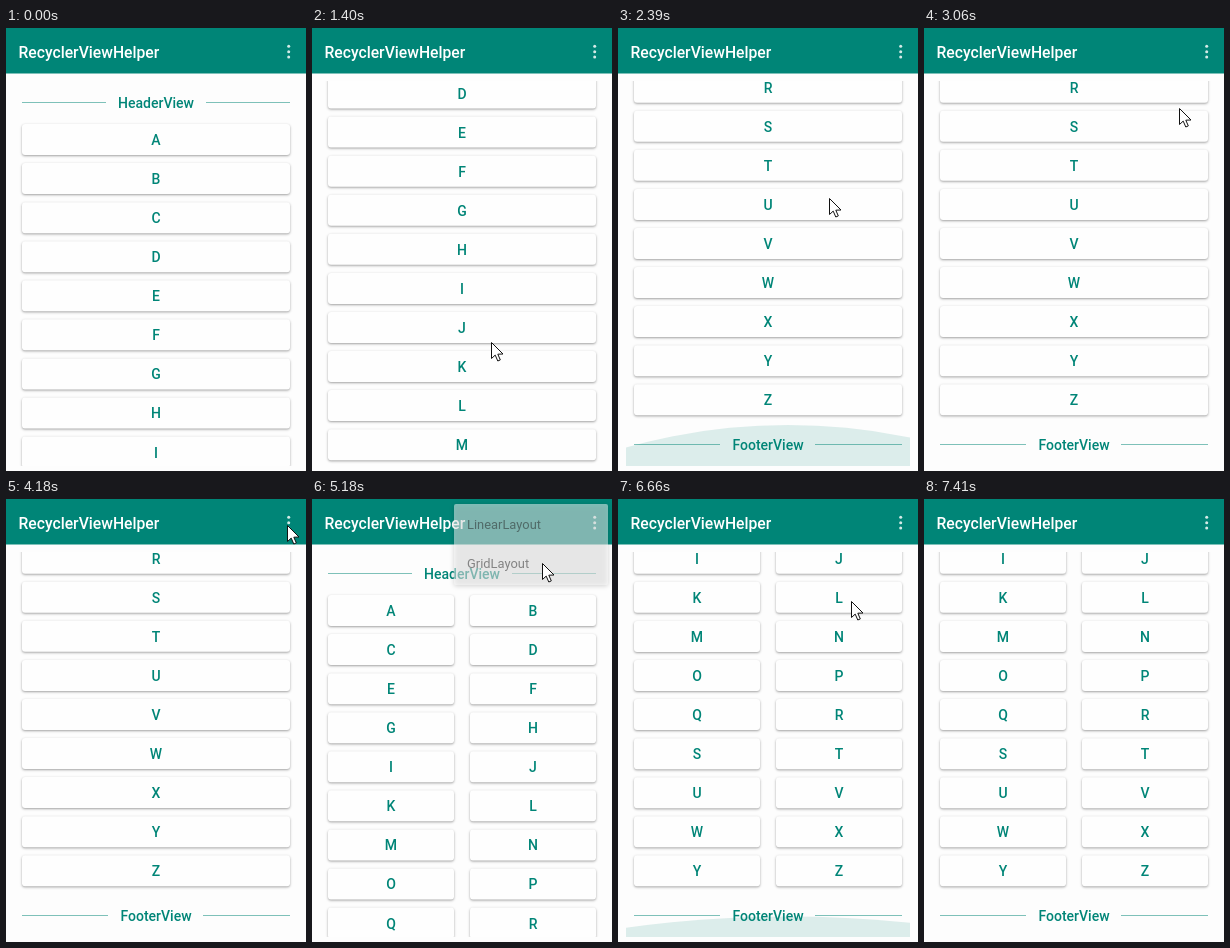
An HTML page with a canvas for the animation above (7870 ms loop, 300x443 px).

```html
<!DOCTYPE html>
<html lang="en">
<head>
<meta charset="utf-8">
<title>RecyclerViewHelper</title>
<style>
  html, body { margin: 0; width: 100%; height: 100%; overflow: hidden; background: #fdfdfd; }
  canvas { display: block; width: 300px; height: 443px; }
</style>
</head>
<body>
<canvas id="stage"></canvas>
<script>
const WIDTH = 300, HEIGHT = 443, LOOP = 7870;
const TEAL = '#008577', FONT = 'Roboto, sans-serif';
const LETTERS = [...'ABCDEFGHIJKLMNOPQRSTUVWXYZ'];
const VIEW = { left: 8, right: 292, top: 53, bottom: 438 };
const FIRST_ROW = 96, ROW = 39.07;

// The picture refreshes once per beat; all timing below is in beats.
const BEATS = 57, BEAT = LOOP / BEATS;
const GRID_START = 37;

// Pointer moves: start, end, destination.
const ENTRY = { x: 172, y: 432 };
const MOVES = [
  { start: 5, end: 7, x: 171, y: 418 },
  { start: 9, end: 11, x: 186, y: 210 },
  { start: 11, end: 13, x: 174, y: 369 },
  { start: 13, end: 17, x: 211, y: 170 },
  { start: 17, end: 25, x: 281, y: 26 },
  { start: 30, end: 34, x: 230, y: 64 },
  { start: 37, end: 42, x: 201, y: 323 },
  { start: 44, end: 48, x: 233, y: 102 },
  { start: 48, end: 52, x: 285, y: 419 }
];

const canvas = document.getElementById('stage');
const ctx = canvas.getContext('2d');
const ratio = window.devicePixelRatio || 1;
canvas.width = WIDTH * ratio;
canvas.height = HEIGHT * ratio;

const progress = (beat, start, end) => Math.min(1, Math.max(0, (beat - start) / (end - start)));
const easeOut = k => 1 - (1 - k) ** 2;
const pulse = (beat, start, peak, end) => progress(beat, start, peak) - progress(beat, peak, end);

function scrollAt(beat) {
  return beat < GRID_START
    ? 491 * progress(beat, 8.5, 13) + 225.5 * easeOut(progress(beat, 13, 16))
    : 208.5 * easeOut(progress(beat, 44, 48));
}

function pointerAt(beat) {
  let { x, y } = ENTRY;
  for (const move of MOVES) {
    const k = progress(beat, move.start, move.end);
    x += (move.x - x) * k;
    y += (move.y - y) * k;
  }
  return { x: Math.round(x), y: Math.round(y) };
}

function text(label, x, baseline, { size = 14, color = TEAL, weight = 500, align = 'center' } = {}) {
  ctx.font = `${weight} ${size}px ${FONT}`;
  ctx.fillStyle = color;
  ctx.textAlign = align;
  ctx.fillText(label, x, baseline);
}

function raisedBox(x, y, w, h, radius, blur, shadow) {
  ctx.save();
  ctx.shadowColor = shadow;
  ctx.shadowBlur = blur * ratio;
  ctx.shadowOffsetY = ratio;
  ctx.fillStyle = '#fefefe';
  ctx.beginPath();
  ctx.roundRect(x, y, w, h, radius);
  ctx.fill();
  ctx.restore();
}

function divider(label, y, gapLeft, gapRight) {
  y = Math.round(y);
  ctx.fillStyle = 'rgba(0, 133, 119, .5)';
  ctx.fillRect(16, y - 1, gapLeft - 16, 1);
  ctx.fillRect(gapRight, y - 1, 284 - gapRight, 1);
  text(label, 150, y + 5);
}

function drawGlow(amount) {
  if (amount <= 0) return;
  const curve = 596 * amount;
  ctx.fillStyle = `rgba(0, 133, 119, ${0.13 * Math.min(1, amount * 2)})`;
  ctx.beginPath();
  ctx.ellipse(170, VIEW.bottom - 41 * amount + curve, 596, curve, 0, 0, Math.PI * 2);
  ctx.fill();
}

function drawList(columns, scroll, glow) {
  ctx.save();
  ctx.beginPath();
  ctx.rect(VIEW.left, VIEW.top, VIEW.right - VIEW.left, VIEW.bottom - VIEW.top);
  ctx.clip();
  divider('HeaderView', 75 - scroll, 100, 200);
  const width = columns === 1 ? 268 : 126;
  LETTERS.forEach((letter, i) => {
    const x = 16 + (i % columns) * 142;
    const y = FIRST_ROW + Math.floor(i / columns) * ROW - scroll;
    raisedBox(x, y, width, 31, 3, 2.5, 'rgba(0, 0, 0, .37)');
    text(letter, x + width / 2, y + 21);
  });
  divider('FooterView', FIRST_ROW + LETTERS.length / columns * ROW + 22 - scroll, 102, 197);
  drawGlow(glow);
  ctx.restore();
}

function drawToolbar() {
  ctx.fillStyle = TEAL;
  ctx.fillRect(0, 0, WIDTH, 45.5);
  text('RecyclerViewHelper', 12.5, 30, { size: 15.7, color: '#fff', align: 'left' });
  ctx.fillStyle = '#d5ebe8';
  for (let i = -1; i <= 1; i++) {
    ctx.beginPath();
    ctx.arc(282.7, 23.7 + i * 5.4, 1.5, 0, Math.PI * 2);
    ctx.fill();
  }
}

function drawMenu(opacity) {
  if (opacity <= 0) return;
  ctx.save();
  ctx.globalAlpha = opacity;
  raisedBox(142, 5, 154, 81, 2, 5, 'rgba(0, 0, 0, .35)');
  ['LinearLayout', 'GridLayout'].forEach((label, i) =>
    text(label, 155, 30 + i * 39, { size: 12.9, color: '#212121', weight: 400, align: 'left' }));
  ctx.restore();
}

function drawPointer({ x, y }) {
  ctx.save();
  ctx.translate(x + 0.5, y + 0.5);
  ctx.fillStyle = '#fff';
  ctx.strokeStyle = '#111';
  const arrow = new Path2D('M0 0V16L3.7 12.6L6.3 18.5L8.8 17.4L6.3 11.7L11.5 11.5Z');
  ctx.fill(arrow);
  ctx.stroke(arrow);
  ctx.restore();
}

function draw(beat) {
  ctx.setTransform(ratio, 0, 0, ratio, 0, 0);
  ctx.fillStyle = '#fdfdfd';
  ctx.fillRect(0, 0, WIDTH, HEIGHT);
  const glow = pulse(beat, 16, 17, 22) + pulse(beat, 47, 49, 52);
  drawList(beat < GRID_START ? 1 : 2, scrollAt(beat), glow);
  drawToolbar();
  drawMenu(progress(beat, 30, 32) - progress(beat, 36, 38));
  if (beat >= 5 && beat < 53) drawPointer(pointerAt(beat));
}

const start = performance.now();
function frame() {
  const time = (performance.now() - start) % LOOP;
  // A small lead absorbs rounding at beat boundaries.
  draw(Math.floor((time + 2) / BEAT) % BEATS);
  requestAnimationFrame(frame);
}
frame();
</script>
</body>
</html>
```
